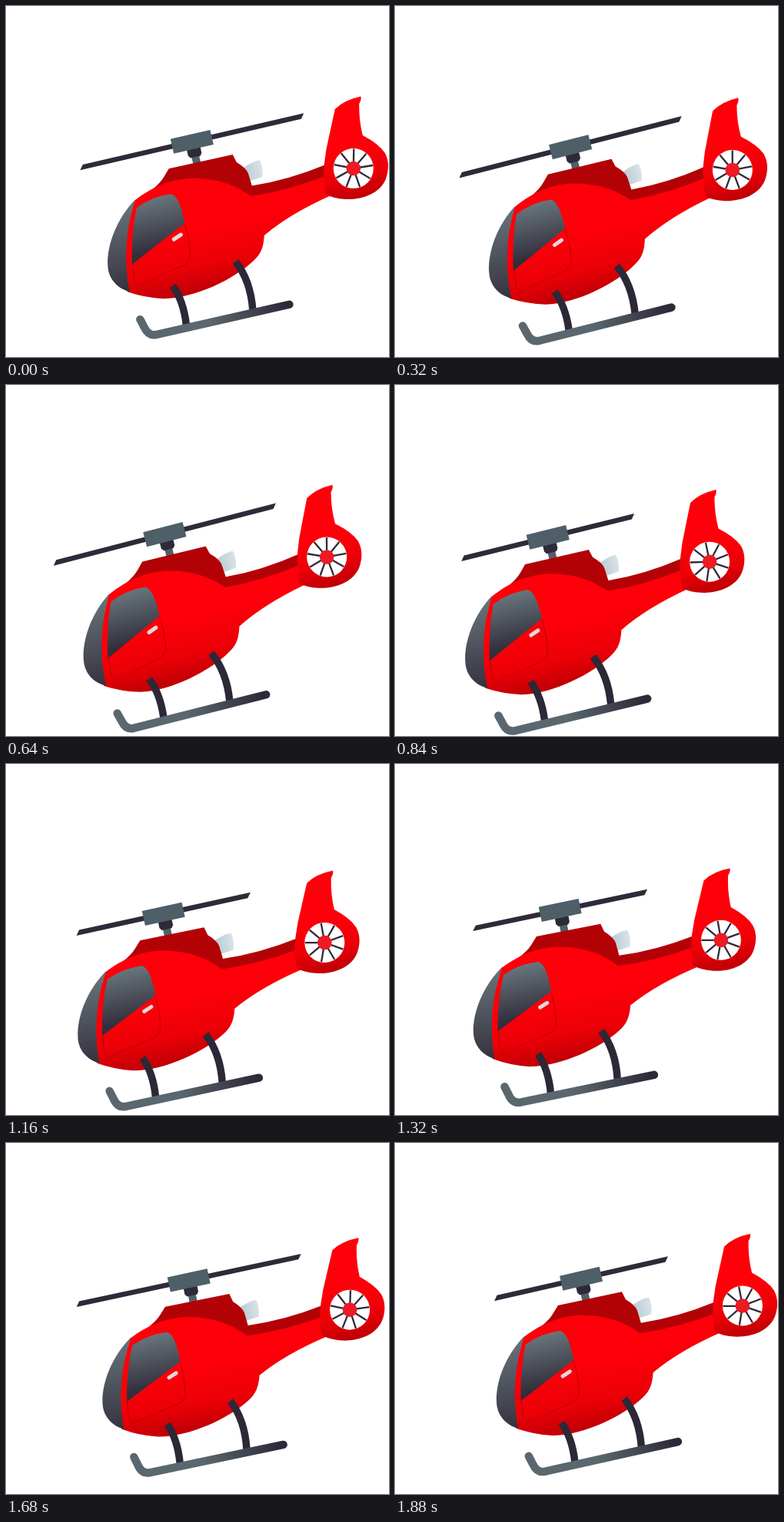
Write an HTML page that moves like this. It is 498 px wide and 456 px high and loops after 1920 ms.

```html
<!DOCTYPE html>
<html lang="en">
<head>
<meta charset="utf-8">
<title>Helicopter</title>
<style>
  html, body { margin: 0; width: 100%; height: 100%; overflow: hidden; background: #fff; }
  svg { display: block; width: 498px; height: 456px; }
</style>
</head>
<body>
<svg viewBox="0 0 498 456">
  <defs>
    <linearGradient id="hull" gradientUnits="userSpaceOnUse" x1="206" y1="295" x2="225" y2="384">
      <stop offset="0" stop-color="#fe0009"/>
      <stop offset=".55" stop-color="#ec0007"/>
      <stop offset="1" stop-color="#b60004"/>
    </linearGradient>
    <linearGradient id="fin" gradientUnits="userSpaceOnUse" x1="446" y1="185" x2="461" y2="253">
      <stop offset="0" stop-color="#fe0009"/>
      <stop offset=".5" stop-color="#ec0007"/>
      <stop offset="1" stop-color="#b80004"/>
    </linearGradient>
    <linearGradient id="nose" gradientUnits="userSpaceOnUse" x1="140" y1="262" x2="160" y2="370">
      <stop offset="0" stop-color="#65727a"/>
      <stop offset="1" stop-color="#36323f"/>
    </linearGradient>
    <linearGradient id="pane" gradientUnits="userSpaceOnUse" x1="190" y1="248" x2="206" y2="316">
      <stop offset="0" stop-color="#69767d"/>
      <stop offset="1" stop-color="#322e3c"/>
    </linearGradient>
    <linearGradient id="pipe" gradientUnits="userSpaceOnUse" x1="310" y1="215" x2="334" y2="210">
      <stop offset="0" stop-color="#bccbd3"/>
      <stop offset="1" stop-color="#d8e4e9"/>
    </linearGradient>
    <linearGradient id="skid" gradientUnits="userSpaceOnUse" x1="265" y1="411" x2="365" y2="389">
      <stop offset="0" stop-color="#5a676f"/>
      <stop offset="1" stop-color="#2d2938"/>
    </linearGradient>
  </defs>

  <g id="craft">
    <g transform="translate(242 176) rotate(-13)">
      <path fill="#4e6069" d="M-5 18H5V34H-5Z"/>
      <path fill="#2e2a39" d="M-9 8H9V17L6.500 20.500H-6.500L-9 17Z"/>
      <path id="blades" fill="#2e2a39"/>
      <path fill="#4e5f68" d="M-26.500-9.500H26.500V10H-26.500Z"/>
    </g>

    <path fill="url(#pipe)" d="M306 213Q317 203 330 200Q335 210 333.500 222L315 228Z"/>
    <path fill="#b30206" d="M188 240Q201 230 206 221L212 211L295 193L300 203Q312 210 315 217L320 233.500Q368 226 416 206L420 240L320 260L230 250Z"/>
    <path fill="url(#hull)" d="M167 253C196 230 226 222 252 224C282 226 300 234 319 247Q367 240 418 220L423 246Q369 270 336 298C335 313 332 322 322 331C298 354 246 380 205 380Q181 379 158 371L150 320Z"/>
    <path fill="url(#nose)" d="M168.500 251C144 276 131 311 132.500 337C133 354 145 367 161 371C154 337 154 294 168.500 251Z"/>
    <path fill="none" stroke="#cc0007" stroke-width="1.500" d="M164.500 335L167.500 357Q169 364 177 361L231 337Q240 332 240 323Q238 300 232.500 283"/>
    <path fill="url(#pane)" d="M170 262Q190 247 215 244Q221 246 225 255Q230 267 232.500 282L164 335.500Q163 293 170 262Z"/>
    <path fill="none" stroke="#dedbdc" stroke-width="5" stroke-linecap="round" d="M218.500 303L227.500 297"/>

    <path fill="url(#fin)" d="M428 134Q440 122 461.500 117.500Q463 121 459.500 127Q459 148 464 168Q485 179 493 191Q501 206 494 225C486 244 463 252 441 251Q425 250 416 244.500Q412 226 414 205Q416 186 421 166Z"/>
    <circle cx="452" cy="211" r="26" fill="#fff"/>
    <path id="spokes" fill="none" stroke="#2e2a39" stroke-width="2.300"/>
    <circle cx="452" cy="211" r="9.300" fill="#ee1a24"/>

    <g fill="none" stroke="#2c2837" stroke-width="9.500">
      <path d="M217 363.500Q231 383 234.500 414"/>
      <path d="M298.500 332Q318 356 321 395"/>
    </g>
    <path fill="none" stroke="url(#skid)" stroke-width="10.500" stroke-linecap="round" stroke-linejoin="round" d="M174.500 407L180 417.500Q185 428.500 195 427L368.500 387.700"/>
  </g>
</svg>
<script>
  const LOOP = 1920, STEP = 40, TAU = Math.PI * 2;
  const byId = id => document.getElementById(id);
  const craft = byId("craft"), blades = byId("blades"), spokes = byId("spokes");

  function bladePath(half) {
    return `M${-half} 3.500L${5 - half}-3H${half}L${half - 5} 3.500Z`;
  }

  function spokePath(turn) {
    let d = "";
    for (let i = 0; i < 9; i++) {
      const a = (turn + i * 40) * Math.PI / 180;
      d += `M452 211L${452 + 25.5 * Math.cos(a)} ${211 + 25.5 * Math.sin(a)}`;
    }
    return d;
  }

  function draw(now) {
    const step = Math.floor(now % LOOP / STEP);
    const t = step * STEP;
    const odd = step % 2;
    // Drift down-left and back, with the pitch a quarter cycle behind.
    const drift = (1 - Math.cos(TAU * (t + 45) / LOOP)) / 2;
    const pitch = -0.15 - 1.45 * Math.sin(TAU * (t - 25) / LOOP);
    craft.setAttribute("transform",
      `translate(${-44 * drift} ${22 * drift}) rotate(${pitch} 242 176)`);
    // Both rotors flicker between two positions.
    blades.setAttribute("d", bladePath(odd ? 116.5 : 150));
    spokes.setAttribute("d", spokePath(odd ? -101 : -89));
  }

  const start = performance.now();
  function tick() {
    draw(performance.now() - start);
    requestAnimationFrame(tick);
  }
  tick();
</script>
</body>
</html>
```
